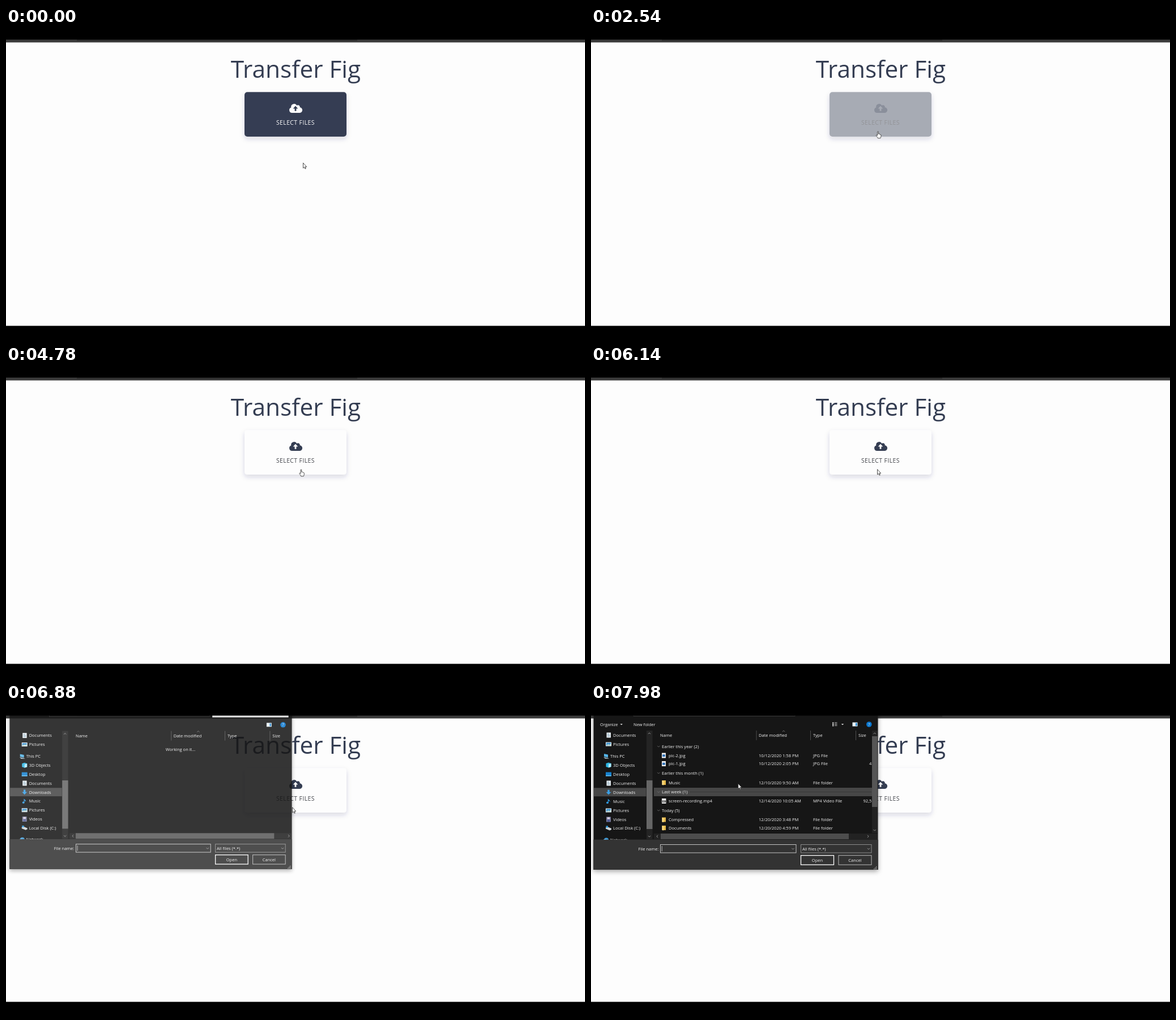
Recreate the animation shown at these times as an HTML page. Size 1022x548 px, loop 8000 ms.

```html
<!DOCTYPE html>
<html lang="en">
<head>
<meta charset="utf-8">
<title>Upload page</title>
<style>
  html, body { margin: 0; width: 100%; height: 100%; overflow: hidden; background: #000; }
  svg { display: block; width: 100%; height: 100%; }
  text { font-family: "Open Sans", "Noto Sans", sans-serif; white-space: pre; }
  #dialog text { font-size: 7.55px; fill: #f0f0f0; }
</style>
</head>
<body>
<svg id="stage" viewBox="0 0 1022 548"></svg>
<script>
const LOOP = 8000;
const NAVY = [52, 61, 82], PAPER = [253, 253, 253], INK = [66, 68, 74];

const rect = (x, y, w, h, fill, more = '') =>
  `<rect x="${x}" y="${y}" width="${w}" height="${h}" fill="${fill}" ${more}/>`;
const path = (d, fill, more = '') => `<path d="${d}" fill="${fill}" ${more}/>`;
const line = (d, color, width = 0.8) => path(d, 'none', `stroke="${color}" stroke-width="${width}"`);
// Text placed by its left edge and vertical centre
const label = (x, y, s, more = '') => `<text x="${x}" y="${y + 2.7}" ${more}>${s}</text>`;
const chevron = (x, y, dir, color = '#aaa') => {
  const angle = { down: 0, left: 90, up: 180, right: 270 }[dir];
  return `<g transform="translate(${x} ${y}) rotate(${angle})">${line('M-2.2-1.1L0 1.1 2.2-1.1', color)}</g>`;
};
const box = (x, y, w, h, stroke, width = 1) =>
  rect(x, y, w, h, '#333', `stroke="${stroke}" stroke-width="${width}"`);

// Small icons, centred on the origin
const icons = {
  page: rect(-4, -4.5, 8, 9, '#f4f4f4') + path('M1.5-4.5l2.5 2.5h-2.5z', '#999'),
  doc: rect(-3.5, -4.5, 7.5, 9, '#e8eef2') + line('M-2-2h3M-2 0h4.5M-2 2h4.5', '#6c93a8'),
  pic: rect(-5, -3.5, 10, 7, '#eef5fa') + rect(-4, -2.5, 8, 5, '#3f93cf') + path('M-4 2.5L-1 0l2 1 3-1.5v3z', '#c9dfcf'),
  pc: path('M-4-4L3-2.5v5L-4 1z', '#55b5e8') + path('M-5 2l8 1.5 2 1h-7z', '#b9d5e4'),
  cube: path('M-4.5-3L0-4.5 4.5-3v6L0 4.5-4.5 3z', '#2fb8e6') + path('M0-1.5L4.5-3v6L0 4.5z', '#b5ecfa'),
  desk: rect(-5, -3.5, 10, 7, '#1682d0') + rect(-5, 2, 10, 1.5, '#65c2f5'),
  down: path('M-1.7-4.3h3.4v4h2.8L0 4.3-4.5-.3h2.8z', '#3aa0e6'),
  note: path('M-1.2-4.5C0-2.5 3.5-2 2.2 1.5 2-.5.5-1 0-1v3.5a2 1.7 0 1 1-1.2-1.6z', '#2f9be8'),
  film: rect(-4, -4.5, 8, 9, '#77799a') + rect(-2.2, -3.8, 4.4, 3.4, '#d5cde0') + rect(-2.2, .4, 4.4, 3.4, '#4d5a98'),
  disk: path('M-5-1l3-1.5L5 .5v2L2 4-5 1z', '#cfd6da') + rect(-4.5, -4, 3.5, 3, '#2d9be0'),
  net: `<circle r="4" fill="#3f9ad6"/>` + rect(-5, -1, 5, 4, '#b9dcf0'),
  folder: path('M-3-4h6.5v8H-3z', '#e9bd4e') + path('M-3-4l2.6 1.5V4.5L-3 4z', '#ffe08a'),
  jpg: rect(-3.5, -4.5, 7, 9, '#f2f2f2') + rect(-2.4, -1.8, 4.8, 4, '#2d6fb5'),
  mp4: rect(-3.5, -4.5, 7.5, 9, '#ececec') + rect(-4.5, -1, 8, 3.5, '#555') + line('M-3 .7h5', '#fff')
};
const icon = (kind, x, y) => `<g transform="translate(${x} ${y})">${icons[kind]}</g>`;

// label, y, icon, icon while loading
const places = [
  ['Documents', 55, 'doc', 'page'], ['Pictures', 71, 'pic', 'page'], ['This PC', 92, 'pc'],
  ['3D Objects', 108, 'cube'], ['Desktop', 124, 'desk'], ['Documents', 140, 'doc', 'doc'],
  ['Downloads', 156, 'down', 'down'], ['Music', 172, 'note'], ['Pictures', 188, 'pic', 'pic'],
  ['Videos', 204, 'film'], ['Local Disk (C:)', 219.5, 'disk', 'page'], ['Network', 240.5, 'net']
];
const isRoot = name => name === 'This PC' || name === 'Network';
const placeIcons = col => places.map(p => p[col] ? icon(p[col], isRoot(p[0]) ? 27 : 31, p[1]) : '').join('');

const groups = [['Earlier this year (2)', 75], ['Earlier this month (1)', 122], ['Last week (1)', 155.5], ['Today (5)', 188]];
const files = [
  ['pic-2.jpg', 91, '10/12/2020 1:58 PM', 'JPG File', 'jpg', ''],
  ['pic-1.jpg', 105.5, '10/12/2020 2:05 PM', 'JPG File', 'jpg', '4'],
  ['Music', 139, '12/10/2020 9:50 AM', 'File folder', 'folder', ''],
  ['screen-recording.mp4', 171.5, '12/14/2020 10:05 AM', 'MP4 Video File', 'mp4', '92,5'],
  ['Compressed', 204.5, '12/20/2020 3:48 PM', 'File folder', 'folder', ''],
  ['Documents', 219, '12/20/2020 4:59 PM', 'File folder', 'folder', '']
];

const page = `
  ${rect(0, 0, 1022, 548, '#fdfdfd')}
  ${rect(0, 20, 1022, 5.5, '#3b3b3b')}${rect(125, 20, 495, 2.5, '#2b2b2b')}
  <text x="511.5" y="88" font-size="42.3" text-anchor="middle" fill="#343d52">Transfer Fig</text>
  <rect id="button" x="421" y="113.3" width="180" height="78.7" rx="5" filter="url(#lift)"/>
  <g id="cloud" transform="translate(500 133.5) scale(.97)">
    <path d="M5 17a5 5 0 0 1-1.6-9.7A5.6 5.6 0 0 1 13.8 3.6 3.5 3.5 0 0 1 19.3 7 5 5 0 0 1 18.2 17z"/>
  </g>
  <path id="arrowUp" d="M511 137.8l4.3 4.6h-2.9v4.4h-2.8v-4.4h-2.9z"/>
  <text id="caption" x="477" y="171.3" font-size="10.4" letter-spacing=".42">SELECT FILES</text>`;

const loading = `<g id="loading">
  ${placeIcons(3)}
  ${rect(4.5, -13, 502, 59.5, '#fff')}${rect(108.8, 46, 2.2, 194, '#fff')}
  ${rect(108.8, 228, 13, 11.5, '#fff')}${rect(495, 228, 11.5, 11.5, '#fff')}
  ${rect(83, 250.5, 35, 10, '#fff')}${rect(122, 248.5, 240.5, 15, '#fff')}
  ${rect(370.5, 248.5, 125, 15, '#fff')}${rect(370.5, 267, 58.5, 17.5, '#fff')}
  ${rect(437, 267, 58.5, 17.5, '#fff')}${rect(495, 281.5, 11.5, 11.5, '#fff')}
</g>`;

const painted = `<g id="painted">
  ${placeIcons(2)}
  ${rect(4.5, 239.8, 502, 53.2, '#333')}
  ${rect(75, 5, 285, 16.5, '#191919', 'stroke="#444" stroke-width=".7"')}
  ${rect(461.5, 32.5, 9, 7, '#e8f2f8')}${rect(467, 33.5, 2.6, 5, '#2c8ad0')}
  <circle cx="490.8" cy="36" r="4.8" fill="#0b78d0"/>
  ${label(490.8, 36, '?', 'text-anchor="middle"')}
  ${chevron(117, 234, 'left')}
  ${label(119.5, 256, 'File name:', 'text-anchor="end"')}
  ${box(122.5, 248.5, 239.5, 14.5, '#c4c4c4')}${chevron(356.5, 256, 'down')}
  ${line('M125.2 251v9.5', '#ddd')}
  ${box(370.5, 248.5, 124.5, 14.5, '#8c8c8c')}${chevron(490, 256, 'down')}
  ${label(373, 256, 'All files (*.*)')}
  ${box(370.5, 267.7, 58, 16.5, '#fff', 1.3)}${label(399.5, 276, 'Open', 'text-anchor="middle"')}
  ${box(437, 267.7, 58, 16.5, '#bbb')}${label(466, 276, 'Cancel', 'text-anchor="middle"')}
  ${[[503, 287], [501, 289], [503, 289], [499, 291], [501, 291], [503, 291]].map(([x, y]) => rect(x, y, 1.2, 1.2, '#bbb')).join('')}
</g>`;

const toolbar = `<g id="toolbar">
  ${label(16, 36, 'Organize')}${path('M51.5 35h4.4l-2.2 2.3z', '#ddd')}${label(75, 36, 'New folder')}
  ${[32.5, 35, 37.5].map(y => rect(426, y, 2.5, 1.8, '#ddd') + rect(430, y, 4.5, 1.2, '#aaa')).join('')}
  ${path('M441.8 35h4.4l-2.2 2.3z', '#ddd')}
</g>`;

const emptyList = `<g id="emptyList">
  ${rect(122, 229, 353, 10, '#5a5a5a')}${chevron(501, 234, 'right')}
  ${label(282, 80, 'Working on it...')}
</g>`;

const fullList = `<g id="fullList">
  <g id="hover">${rect(111, 148, 385, 15, '#474747')}${line('M174 155.5H495', '#333')}</g>
  ${groups.map(([s, y]) => chevron(119.3, y, 'down', '#777') + label(125, y, s)).join('')}
  ${files.map(([name, y, date, type, kind, size]) =>
    icon(kind, 128.5, y) + label(137, y, name) + label(296, y, date) + label(392, y, type) +
    label(495.3, y, size, 'text-anchor="end"')).join('')}
  ${rect(496, 47, 10, 181, '#222')}${rect(496, 57, 9.5, 125, '#555')}
  ${chevron(500.7, 52, 'up')}${chevron(500.7, 223, 'down')}
  ${rect(123, 229, 332, 10, '#4d4d4d')}${chevron(489, 234, 'right')}
</g>`;

const dialog = `<g id="dialog">
  ${rect(4.5, -13, 502, 306, '#191919', 'filter="url(#drop)"')}
  ${rect(5, 148.3, 92.5, 15, '#474747')}
  ${rect(98, 47, 10.5, 192, '#242424')}${rect(98, 135, 10.5, 86, '#666')}
  ${chevron(103, 52, 'up')}${chevron(103, 234, 'down')}
  ${rect(111, 229, 395, 10, '#222')}
  ${places.map(([s, y]) => label(isRoot(s) ? 34 : 39, y, s)).join('')}
  ${line('M292 47V64M387.5 47V64M467.5 47V64', '#5c5c5c')}
  ${chevron(340, 48, 'up', '#888')}
  ${label(122, 55.5, 'Name')}${label(296, 55.5, 'Date modified')}${label(392, 55.5, 'Type')}${label(472, 55.5, 'Size')}
  ${rect(4.5, 239.8, 502, 53.2, '#333')}
  ${emptyList}${fullList}${loading}${painted}${toolbar}
  <g id="search">${rect(365, 5, 135.5, 17.8, '#fff')}</g>
</g>`;

const stage = document.getElementById('stage');
stage.innerHTML = `<defs>
    <filter id="lift" x="-20%" y="-30%" width="140%" height="170%"><feDropShadow dx="0" dy="4" stdDeviation="4.5" flood-color="#32325d" flood-opacity=".17"/></filter>
    <filter id="drop" x="-5%" y="-5%" width="110%" height="115%"><feDropShadow dx="0" dy="3" stdDeviation="4" flood-opacity=".35"/></filter>
  </defs>
  ${page}${dialog}
  ${rect(0, 0, 1022, 20.5, '#000')}${rect(0, 526.5, 1022, 21.5, '#000')}
  <g id="cursor" stroke="#222" stroke-width=".8" stroke-linejoin="round" fill="#fff">
    <path id="arrow" d="M0 0V9.2L2.1 7.4 3.5 10.5 4.8 9.9 3.5 6.9H6.2Z"/>
    <path id="hand" d="M.2 1c0-1.1 1.7-1.1 1.7 0v3.6c.6-.5 1.5-.2 1.6.5.6-.4 1.4-.1 1.5.7.7-.3 1.4.1 1.4.9v2.2c0 1.4-.9 1.9-1 3.2H.8C.5 10.6-1.3 8.8-1.9 7.6-2.4 6.7-1.3 6-.6 6.7L.2 7.5z"/>
  </g>`;

const el = {};
stage.querySelectorAll('[id]').forEach(n => el[n.id] = n);

const clamp = v => Math.min(1, Math.max(0, v));
const span = (t, from, to) => clamp((t - from) / (to - from));
const easeOut = (u, power) => 1 - (1 - u) ** power;
const mix = (a, b, k) => `rgb(${a.map((v, i) => Math.round(v + (b[i] - v) * k))})`;
const show = (name, on) => el[name].setAttribute('display', on ? 'inline' : 'none');

// time, x, y of the pointer tip
const route = [
  [1500, 524.5, 238.5], [1780, 574, 234], [2240, 505.5, 182.7],
  [4740, 505.5, 182.7], [4880, 575, 183], [5020, 505.5, 182.7],
  [7520, 505.5, 182.7], [7980, 259.8, 140.7]
];
function pointer(t) {
  const next = route.findIndex(k => k[0] > t);
  if (next === 0) return route[0].slice(1);
  if (next < 0) return route[route.length - 1].slice(1);
  const a = route[next - 1], b = route[next];
  const u = span(t, a[0], b[0]), k = u * u * (3 - 2 * u);
  return [a[1] + (b[1] - a[1]) * k, a[2] + (b[2] - a[2]) * k];
}

function draw(t) {
  const hover = easeOut(span(t, 2365, 3080), 3);
  const face = mix(NAVY, PAPER, hover);
  el.button.setAttribute('fill', face);
  el.arrowUp.setAttribute('fill', face);
  el.cloud.setAttribute('fill', mix(PAPER, NAVY, hover));
  el.caption.setAttribute('fill', mix(PAPER, INK, hover));

  const open = easeOut(span(t, 6450, 7260), 2.6);
  show('dialog', open > 0);
  el.dialog.setAttribute('opacity', open);
  el.dialog.setAttribute('transform',
    `translate(255.5 140) scale(${1 - 0.055 * (1 - open)}) translate(-255.5 -140)`);
  show('loading', t < 6790);
  show('painted', t >= 6790);
  show('search', t >= 6790 && t < 7200);
  show('toolbar', t >= 7280);
  show('emptyList', t < 7540);
  show('fullList', t >= 7540);
  show('hover', t >= 7760);

  const hand = t >= 2200 && t < 6140;
  show('hand', hand);
  show('arrow', !hand);
  el.cursor.setAttribute('transform', `translate(${pointer(t)})`);
}

function tick() {
  draw(performance.now() % LOOP);
  requestAnimationFrame(tick);
}
tick();
</script>
</body>
</html>
```
